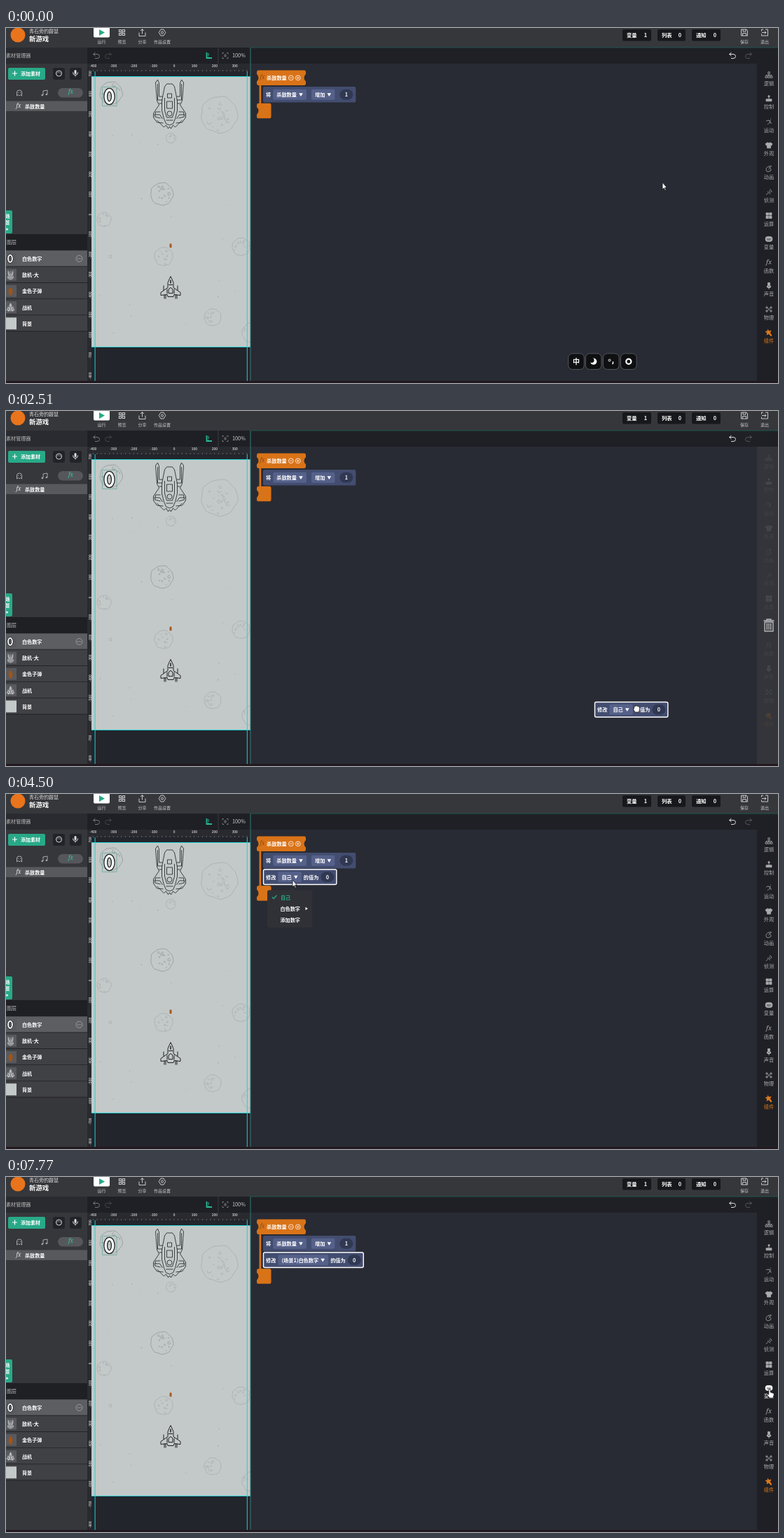
Write an HTML page with a canvas that moves like this. It is 1102x508 px and loops after 8 s.

```html
<!DOCTYPE html>
<html lang="zh-CN">
<head>
<meta charset="utf-8">
<style>
html,body{margin:0;width:100%;height:100%;overflow:hidden;background:#282b33}
canvas{display:block}
</style>
</head>
<body>
<canvas id="stage" width="1102" height="508"></canvas>
<script>
const c = document.getElementById('stage').getContext('2d');
const FONT = '"Noto Sans CJK SC","Noto Sans CJK",sans-serif';
const GREEN = '#28a988', ORANGE = '#d97318', BLOCK = '#434d70', FIELD = '#56618a', CYAN = '#24d0d2';

function rect(x, y, w, h, fill, r = 0, line, width = 1) {
  c.beginPath();
  c.roundRect(x, y, w, h, r);
  if (fill) { c.fillStyle = fill; c.fill(); }
  if (line) { c.strokeStyle = line; c.lineWidth = width; c.stroke(); }
}
function disc(x, y, r, fill, line, width = 1) { rect(x - r, y - r, 2 * r, 2 * r, fill, r, line, width); }
function setFont(size, weight = 600) { c.font = `${weight} ${size}px ${FONT}`; }
function text(s, x, y, color = '#eee', size = 7, align = 'left', weight = 600) {
  setFont(size, weight);
  c.fillStyle = color;
  c.textAlign = align;
  c.textBaseline = 'middle';
  c.fillText(s, x, y + .3);
}
function fx(x, y, color, size = 8) {
  c.font = `italic ${size}px "Noto Serif",serif`;
  c.fillStyle = color;
  c.textAlign = 'center';
  c.textBaseline = 'middle';
  c.fillText('fx', x, y);
}
function shape(d, x, y, line, fill, width = 1, sx = 1, sy = sx) {
  const p = new Path2D(d);
  c.save();
  c.translate(x, y);
  c.scale(sx, sy);
  c.lineWidth = width;
  if (fill) { c.fillStyle = fill; c.fill(p); }
  if (line) { c.strokeStyle = line; c.stroke(p); }
  c.restore();
}
function mirrored(d, x, y, line, width, s = 1) {
  shape(d, x, y, line, null, width, s);
  shape(d, x, y, line, null, width, -s, s);
}
function random(seed) {
  return () => (seed = (seed * 16807) % 2147483647) / 2147483647;
}

// Blocks: plain string = label, [s] = number pill, {d: s} = dropdown
const partWidth = p => {
  setFont(7.2);
  return Array.isArray(p) ? Math.max(19, c.measureText(p[0]).width + 10)
    : p.d ? c.measureText(p.d).width + 19 : c.measureText(p).width;
};
function block(x, y, parts, selected) {
  const gap = i => i && typeof parts[i] != 'string' && typeof parts[i - 1] != 'string' ? 7 : i ? 3 : 0;
  const w = parts.reduce((sum, p, i) => sum + partWidth(p) + gap(i), 8);
  rect(x, y, w, 22.5, BLOCK, 2);
  if (selected) rect(x + .5, y + .5, w - 1, 21.5, null, 2, '#fff', 1.4);
  let px = x + 4;
  parts.forEach((p, i) => {
    px += gap(i);
    const pw = partWidth(p), mid = y + 11.3;
    if (Array.isArray(p)) {
      rect(px, mid - 7.5, pw, 15, '#303852', 7.5);
      text(p[0], px + pw / 2, mid, '#fff', 7.2, 'center');
    } else if (p.d) {
      rect(px, mid - 7.5, pw, 15, FIELD, 2);
      text(p.d, px + 5, mid, '#fff', 7.2);
      shape('M-2.8-2H2.8L0 2.8Z', px + pw - 8, mid, null, '#fff');
    } else text(p, px, mid, '#fff', 7.2);
    px += pw;
  });
}

const UNDO = 'M-1.5-4.5L-4.5-2L-1.5 .5M-4.5-2H1Q4.5-2 4.5 1T1 4H-2';
const ENEMY = [
  'M0 10H-4L-7 14L-9 24L-11 34V48L-8 60L-5 67L0 69',
  'M-10 28H-15V9L-17 4L-20 8L-18 34L-15 40L-23 52V58L-18 65L-9 66',
  'M-17 10V33M-10 33H-17M-11 38H-15M-13 50H-20L-21 57L-13 59',
  'M-22 54H-14L-10 60M-18 62L-12 68L-8 72L-5 69L-2 74L0 71',
  'M0 24H-3V30H0M0 35H-4V45H0M-7 30V48L-4 58H0M0 49A3 3 0 0 0 0 56M-5 62H0'
].join('');
const JET = 'M0 0L-2 4L-4 9V16L-14 23V27L-5 26L-4 29H0M-10 20V13M-9 26V32M-7 32V26M0 16Q-3 17-3 20V24H0M-3 12H0M-5 18V25M0 5V10';

function asteroid(x, y, r, seed, color) {
  const rnd = random(seed * 7919), phase = rnd() * 6;
  c.strokeStyle = color;
  c.lineWidth = .8;
  c.beginPath();
  for (let a = 0; a <= 6.3; a += .15) {
    const q = r * (1 + .025 * Math.sin(a * 5 + phase) + .02 * Math.sin(a * 9));
    c.lineTo(x + q * Math.cos(a), y + q * Math.sin(a));
  }
  c.closePath();
  c.stroke();
  for (let i = 0; i < r * .7; i++) {
    const a = rnd() * 6.28, q = r * .85 * Math.sqrt(rnd());
    c.beginPath();
    c.arc(x + q * Math.cos(a), y + q * Math.sin(a), .5 + rnd() * r * .09, 0, 2 + rnd() * 4);
    c.stroke();
  }
}

function zero(x, y, height) {
  c.beginPath();
  c.ellipse(x, y, height * .23, height * .4, 0, 0, 7);
  [['#1b1d1e', .26], ['#fff', .15]].forEach(([color, width]) => {
    c.strokeStyle = color;
    c.lineWidth = height * width;
    c.stroke();
  });
}

function topBar() {
  rect(0, 0, 1102, 28, '#36373b');
  disc(17, 10, 10.5, '#e9741b');
  text('青石旁的鼹鼠', 33, 4, '#ddd', 7, 'left', 400);
  text('新游戏', 33, 15.5, '#fff', 9.4);
  rect(125, -2, 23, 15.5, '#fff', 2);
  shape('M-3.5-4.5L4.5 0L-3.5 4.5Z', 136.5, 6.5, null, GREEN);
  const gray = '#c8c9cb';
  shape('M-4-4h3v3h-3zM1-4h3v3h-3zM-4 1h3v3h-3zM1 1h3v3h-3zM-1 0H1', 165.5, 6.5, gray, null, 1.2);
  shape('M-4.5 0V5H4.5V0M0 2V-5M-2.5-2.5L0-5L2.5-2.5', 194.5, 6.5, gray);
  shape('M-2-4.5H2L4.8 0L2 4.5H-2L-4.8 0Z', 223, 6.5, gray);
  disc(223, 6.5, 1.6, null, gray);
  [['运行', 136.5], ['预览', 165.5], ['分享', 194.5], ['作品设置', 223], ['保存', 1054], ['退出', 1083]]
    .forEach(([s, x]) => text(s, x, 19, gray, 6, 'center', 400));
  [['变量', '1', 880, 41], ['列表', '0', 930, 40], ['通知', '0', 979, 41]].forEach(([s, n, x, w]) => {
    rect(x, 2, w, 16.5, '#17181b', 2);
    text(s, x + 6, 10.3, '#fff', 7.3);
    text(n, x + w - 8, 10.3, '#fff', 7.3, 'center');
  });
  shape('M-4.5-4.5H3L4.5-3V4.5H-4.5ZM-2-4.5V-1.5H2V-4.5M-2.5 4.5V1H2.5V4.5', 1054, 6.5, gray);
  shape('M1-4.5H4.5V4.5H-4.5V2M-4.5-2V-4.5H-2M-4 0H2M0-2L2 0L0 2', 1083, 6.5, gray);
}

function leftPanel() {
  rect(0, 28, 116, 480, '#36373b');
  rect(0, 28, 116, 23, '#2a2b30');
  text('素材管理器', 0, 39, '#bbb', 7.1, 'left', 400);
  rect(3, 57, 53, 17, GREEN, 2);
  shape('M-3.5 0H3.5M0-3.5V3.5', 12.5, 65, '#fff', null, 1.2);
  text('添加素材', 21, 65, '#fff');
  rect(67, 57, 17, 17, '#222328', 3);
  rect(91, 57, 17, 17, '#222328', 3);
  disc(75.5, 65, 4, null, '#ddd');
  [[-1.6, -1], [0, -2], [1.7, -.7]].forEach(([x, y]) => disc(75.5 + x, 65 + y, .6, '#ddd'));
  rect(97.5, 60, 3, 6, '#ddd', 1.5);
  shape('M-3.5-1Q-3.5 3 0 3T3.5-1M0 3V5', 99, 64.5, '#ddd');
  shape('M-3.5 4V-1Q-3.5-4 0-4T3.5-1V4L1.5 2.5L0 4L-1.5 2.5ZM-1.5-1V0M1.5-1V0', 19, 93, '#aaa');
  shape('M-2 3V-3L4-4V2', 55, 93, '#aaa');
  disc(51.8, 96, 1.3, '#aaa');
  disc(57.8, 95, 1.3, '#aaa');
  rect(74, 86, 36, 13.5, '#56575b', 7);
  fx(92.5, 92, '#2cd0a4');
  rect(0, 104.5, 116, 14.5, '#58595d');
  fx(18, 111.5, '#eee');
  text('杀敌数量', 27, 112, '#fff', 7.1);
  rect(-3, 261, 12, 33, GREEN, 2);
  text('场', -1, 269.5, '#fff', 6.5);
  text('景', -1, 278.5, '#fff', 6.5);
  shape('M-1.5-2L1.5 0L-1.5 2Z', 2, 288, null, '#fff');

  rect(0, 295, 116, 23, '#1f2024');
  text('图层', 1, 306.5, '#bbb', 7, 'left', 400);
  ['白色数字', '敌机-大', '金色子弹', '战机', '背景'].forEach((s, i) => {
    const y = 318.5 + i * 23.2;
    rect(0, y, 116, 22.5, i ? '#404145' : '#5d5e62');
    rect(0, y + 22.3, 116, 1, '#222327');
    rect(0, y + 3, 15, 17, i < 4 ? '#595a5e' : '#c3c9c8');
    text(s, 23, y + 11.5, '#fff', 7.1);
  });
  disc(104.5, 330, 4.5, null, '#aaa', .8);
  [-2, 0, 2].forEach(d => disc(104.5 + d, 330, .6, '#ccc'));
  zero(6, 330, 12.5);
  mirrored(ENEMY, 6.5, 347, '#ddd', 2.5, .18);
  c.beginPath();
  c.ellipse(6.5, 377, 2.8, 5.5, 0, 0, 7);
  c.fillStyle = '#a35412';
  c.fill();
  mirrored(JET, 6.5, 394, '#eee', 2, .36);
}

function rulers() {
  rect(116, 28, 233, 480, '#23252c');
  rect(116, 28, 233, 23, '#1f2025');
  rect(116, 51, 233, 11, '#292a2f');
  rect(116, 51, 6, 457, '#292a2f');
  shape(UNDO, 129, 39.5, '#777');
  shape(UNDO, 146, 39.5, '#444', null, 1, -1, 1);
  shape('M-3.5-4V4H4', 290, 39, '#26b793', null, 1.8);
  shape('M-1-2H1M-1 0H1M0 2V3', 289, 39, '#26b793');
  rect(302.5, 28, 1, 23, '#3b3c41');
  shape('M-4-2V-4H-2M2-4H4V-2M4 2V4H2M-2 4H-4V2M-1-1.5H1V1.5H-1Z', 313, 39.5, '#777');
  text('100%', 323, 39.3, '#ccc', 7.3, 'left', 400);
  for (let i = -4; i <= 3; i++) text(String(i * 100), 240 + i * 28.9, 54.2, '#c5c5c5', 4.6, 'center');
  for (let x = 124; x < 349; x += 5.78) rect(x, 60, .6, 2, '#888');
  for (let i = -8; i <= 7; i++) {
    c.save();
    c.translate(119.5, 267 - i * 28.8);
    c.rotate(-Math.PI / 2);
    text(String(i * 100), 0, 0, '#c5c5c5', 4.6, 'center');
    c.restore();
  }
}

function gameStage() {
  c.save();
  c.beginPath();
  c.rect(122, 69.5, 227, 387);
  c.clip();
  rect(122, 69, 227, 388, '#c3c9c8');
  [[150, 93, 16], [304.5, 124, 26], [222.5, 237.5, 16], [235.5, 157.5, 7], [140, 274, 10], [225, 327, 13],
   [335.5, 313, 12.5], [295, 414, 12], [351, 436, 14]].forEach(([x, y, r], i) =>
    asteroid(x, y, r, i + 3, i == 0 || i == 2 ? '#929998' : '#a7adac'));
  const rnd = random(421);
  for (let i = 0; i < 24; i++) disc(124 + rnd() * 222, 120 + rnd() * 330, .4 + rnd() * .5, '#a4aaa9');
  disc(149, 327, 2, null, '#a4aaa9', .7);
  mirrored(ENEMY, 233.5, 70, '#2c3031', .9);
  mirrored(JET, 235, 355.5, '#222', 1);
  rect(233.5, 308.5, 3, 6, '#a55a25', 1.2);
  zero(147.5, 98, 23);
  rect(137.5, 84.5, 20.5, 27, null, 0, '#6ba99c', .8);
  c.restore();
  rect(122, 69, 227, 1, CYAN);
  rect(122, 456, 227, 1, CYAN);
  rect(126.6, 62, 1, 446, CYAN);
  rect(343.8, 62, 1, 446, CYAN);
}

const CATEGORIES = [
  ['逻辑', 'M-1.2-4.5h2.4v2.4h-2.4zM-5 1.5h2.5v2.5h-2.5zM-1.2 1.5h2.4v2.5h-2.4zM2.5 1.5H5v2.5h-2.5zM0-2V1.5M-3.7 1.5V0H3.7V1.5'],
  ['控制', 'M-4 1H4V4H-4ZM0 1V-2M-1-4H1V-2H-1Z', 1],
  ['运动', 'M-4-1L-1-2.5L2 0L0 2L-2 4M1 1L4 2M0-2L3-1M2-4H3'],
  ['外观', 'M-2-4Q0-2 2-4L5-2L3.5 .5L2.5 0V4H-2.5V0L-3.5 .5L-5-2Z', 1],
  ['动画', 'M3-4Q-4-3-4 1T0 4T3 1T0-2M0 0V1M1-1L4-4'],
  ['侦测', 'M-4 4L-1 1M-2-1L2 3M0-2Q2-1 2 1M1-4Q4-3 4 0'],
  ['运算', 'M-4-4h3.4v3.4h-3.4zM.6-4H4v3.4H.6zM-4 .6h3.4V4h-3.4zM.6 .6H4V4H.6z', 1],
  ['变量', 'M-2-3.5H2Q5-3.5 5 0T2 3.5H-2Q-5 3.5-5 0T-2-3.5Z', 1],
  ['函数', ''],
  ['声音', 'M-1.5-4.5H1.5V1H-1.5ZM-3 0Q-3 3 0 3T3 0M0 3V5', 1],
  ['物理', 'M-4-3.5h2v2h-2zM2-3.5h2v2h-2zM-4 1.5h2v2h-2zM2 1.5h2v2h-2zM-2-2L2 2M2-2L-2 2'],
  ['组件', 'M-1.5-4.5L0-2L3-3L1.5 0L4 4L3 5L0 1.5L-3 3L-2.3 0L-5-1.5L-2-2Z', 1]
];

function categories(active, hover, dimmed) {
  rect(1072, 51, 30, 457, dimmed ? '#34353a' : '#1f2025');
  CATEGORIES.forEach(([name, icon, solid], i) => {
    const y = 67.3 + i * 33.52, on = i == active || i == hover;
    const color = on ? '#fff' : i == 11 ? '#e07a1c' : '#aaabae';
    if (i == active) rect(1072, 158, 30, 29, GREEN);
    c.globalAlpha = dimmed ? .13 : 1;
    if (i == 8) fx(1089, y, color, 9);
    else shape(icon, 1089, y, color, solid && color, .8);
    if (i == 7) text('var', 1089, y, '#444', 4, 'center');
    text(name, 1089, y + 11.4, color, 7.2, 'center', 400);
    c.globalAlpha = 1;
  });
  if (dimmed) shape('M-7.5-6H7.5M-3-6V-8H3V-6M-6-4V9H6V-4ZM-2.7-2V7M0-2V7M2.7-2V7', 1089, 306, '#b4b5b8', null, 1.4);
}

const VALUE_BLOCK = target => ['修改', {d: target}, '的值为', ['0']];
const PALETTE = [
  ['显示'], ['隐藏'],
  ['切换造型为', {d: '1.白色数字'}],
  ['切换到第', ['1'], '个造型'],
  ['切换背景的造型为', {d: '纸飞机背景'}],
  ['将角色', {d: '宽度'}, '设置为', ['100']],
  ['将角色大小', {d: '增加'}, ['20'], '%'],
  ['将角色大小设置为', ['50'], '%'],
  ['将角色透明度', {d: '增加'}, ['0.1']],
  ['将角色透明度设置为', ['1']],
  ['将造型', {d: '水平'}, '翻转'],
  VALUE_BLOCK('自己'),
  ['将', {d: '自己'}, '的值', {d: '增加'}, ['1']]
];
function palette() {
  rect(922, 51, 150, 457, '#31333a');
  text('外观', 928, 61.3, '#2cbd98', 8.8);
  shape('M-1-4L4 1L2 1.5L0 3.5L-3.5 0L-1.5-2ZM-2 2L-4 4', 1060, 62, null, '#6d6f75');
  PALETTE.forEach((parts, i) => block(928, 77.8 + i * 34.06 + (i > 10 ? 12.8 : 0), parts));
}

// Orange end piece with a curved socket on its left and optionally its right side
function socket(y, w, bothSides) {
  const right = bothSides ? 'v3q-2.5 2-2.5 5.3t2.5 5.3v3' : 'v16.6';
  shape(`M2 0H${w - 2}q2 0 2 2.5${right}q0 2.4-2 2.4H2q-2 0-2-2.4v-3q2.5-2 2.5-5.3t-2.5-5.3v-3q0-2.5 2-2.5Z`,
    358, y, null, ORANGE);
}
function script(open) {
  const foot = open ? 131.3 : 107.8;
  socket(60.5, 70, true);
  rect(361.5, 80, 2.7, foot - 78, ORANGE);
  socket(foot, 20.5);
  fx(366, 71, '#8d4a10');
  text('杀敌数量', 372, 71.3, '#fff', 7.2);
  [406.8, 416.8].forEach((x, i) => {
    disc(x, 71.3, 3.4, null, '#fff', .8);
    shape(i ? 'M-1.6 0H1.6M0-1.6V1.6' : 'M-1.6 0H1.6', x, 71.3, '#fff', null, .8);
  });
  block(367, 84, ['将', {d: '杀敌数量'}, {d: '增加'}, ['1']]);
}

function inputBar() {
  [814, 838.7, 863.8, 888.8].forEach(x => rect(x - 11.3, 465.8, 22.6, 22.8, '#0f1012', 6, '#55575c', 1));
  text('中', 814, 477, '#fff', 10, 'center');
  disc(838.7, 477.2, 4.6, '#fff');
  disc(836.2, 475.5, 3.4, '#0f1012');
  disc(861.5, 475.5, 1.5, null, '#fff');
  shape('M0 0Q1.5 2-.5 3.5', 866, 477.5, '#fff', null, 1.5);
  disc(888.8, 477.2, 3.6, null, '#fff', 2.2);
}

function menu(expanded) {
  shape('M-4 0L0-4L4 0Z', 408, 138, null, '#303136');
  rect(373, 137.5, 64.5, 53.5, '#303136', 3);
  if (expanded) rect(373, 156, 64.5, 16, '#404248');
  shape('M-3 0L-1 2.3L3.5-2.5', 383, 147.5, GREEN, null, 1.3);
  text('自己', 392, 147.8, GREEN, 7.1);
  text('白色数字', 391.5, 164, '#fff', 7.1);
  text('添加数字', 391.5, 180.3, '#fff', 7.1);
  shape('M-1.5-2.2L1.8 0L-1.5 2.2Z', 429, 164, null, '#fff');
  if (expanded) {
    rect(439, 153, 80, 22, '#303136', 3);
    text('(场景1)白色数字', 452, 164, '#fff', 7.1);
  }
}

const CURSORS = {
  arrow: 'M0 0V10L2.3 8L3.8 11.4L5.2 10.8L3.7 7.5H6.5Z',
  point: 'M-1.2 0Q0-1.4 1.2 0V4L5 5.2Q6.6 6 6.2 8L5 12.2H0L-3.4 8Q-4 6.4-2.5 6.5L-1.2 7.5Z',
  grab: 'M-3.6-1Q-3.4-4-1.5-3.6Q0-5 1.2-3.6Q3-4.4 3.4-2.5L4.6-2V1L3 5H-2L-4.2 1.5Z'
};
// [step, x, y]
const POINTER = [[0, 937, 221], [1, 1030, 195], [2, 1088, 168], [3, 1088, 170], [4, 1030, 220], [5, 993, 260],
  [7, 1001, 456], [9, 1003, 483], [10, 900, 426], [12, 610, 215], [13, 500, 140], [14, 452, 123], [15, 424, 119],
  [17, 409, 123], [18, 409, 123], [20, 418, 161], [23, 484, 166], [25, 486, 182], [26, 540, 194], [28, 920, 270],
  [30, 1090, 303], [31, 1090, 304]];
const DRAG = [[10, 840, 416], [12, 540, 200], [13, 428, 122], [14, 377, 104]];

function along(keys, step) {
  const i = Math.max(1, keys.findIndex(k => k[0] >= step));
  const [s0, x0, y0] = keys[i - 1], [s1, x1, y1] = keys[i], k = (step - s0) / (s1 - s0);
  return [x0 + (x1 - x0) * k, y0 + (y1 - y0) * k];
}

function draw(step) {
  const between = (a, b) => step >= a && step <= b;
  const dragging = between(10, 14), panelOpen = between(2, 9), placed = step >= 15;
  rect(0, 0, 1102, 508, '#282b33');
  topBar();
  rect(349, 28, 753, 23, '#1f2025');
  shape(UNDO, 1037, 39.5, '#ddd');
  shape(UNDO, 1060, 39.5, '#54555a', null, 1, -1, 1);
  leftPanel();
  rulers();
  gameStage();
  rect(348.5, 28, 1, 480, '#2f7a7b');
  rect(349, 27.5, 753, 1, '#1f5753');
  script(step >= 13);
  if (panelOpen) palette();
  categories(panelOpen ? 3 : -1, step >= 30 ? 7 : -1, dragging);
  if (step < 2) inputBar();
  if (between(13, 14)) {
    c.setLineDash([3, 2]);
    rect(367, 107.5, 104.5, 22.5, '#000', 2, '#555');
    c.setLineDash([]);
  }
  if (dragging) block(...along(DRAG, step), VALUE_BLOCK('自己'), true);
  if (placed) block(367, 107.5, VALUE_BLOCK(step < 24 ? '自己' : '(场景1)白色数字'), true);
  if (between(17, 23)) menu(step >= 20);
  rect(0, 505, 1102, 3, '#21191f');
  const kind = between(2, 3) || step >= 30 ? 'point' : between(5, 15) ? 'grab' : 'arrow';
  shape(CURSORS[kind], ...along(POINTER, step), '#15161a', '#fff', .8);
}

let shown = -1;
function frame() {
  const step = Math.min(31, Math.floor((performance.now() % 8000 + 20) / 250));
  if (step != shown) draw(shown = step);
  requestAnimationFrame(frame);
}
frame();
</script>
</body>
</html>
```
